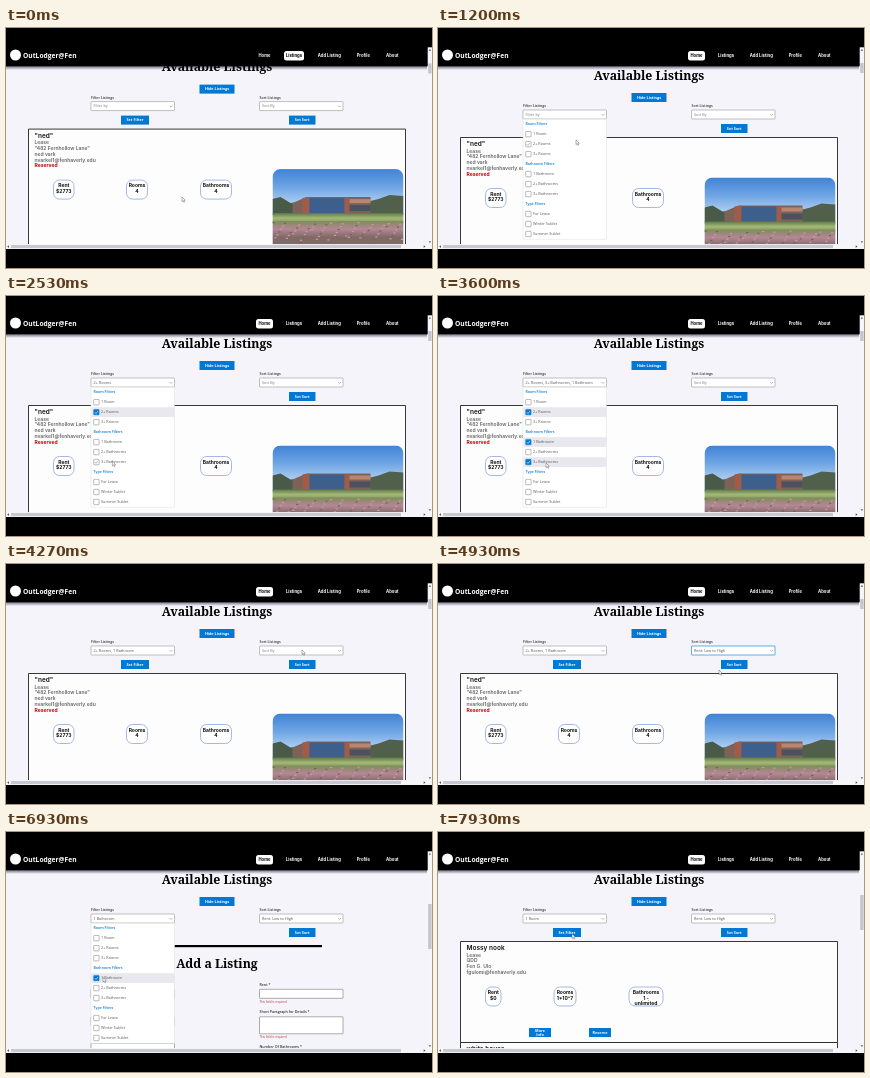
Write an HTML page with a canvas that moves like this. It is 426 px wide and 240 px high and loops after 8000 ms.

```html
<!DOCTYPE html>
<html lang="en">
<head>
<meta charset="utf-8">
<title>Available Listings</title>
<style>
  html, body { margin: 0; width: 100%; height: 100%; overflow: hidden; background: #000; }
  canvas { display: block; width: 100vw; height: 100vh; }
</style>
</head>
<body>
<canvas id="stage"></canvas>
<script>
const W = 426, H = 240, LOOP = 8000;
const canvas = document.getElementById('stage');
const ctx = canvas.getContext('2d');

const BLUE = '#0078d4', PAGE = '#f4f4fa', CARD = '#fdfdfe', INK = '#111', GREY = '#666';
const SANS = '"Open Sans", sans-serif', UI = 'Inter, sans-serif', SERIF = '"Noto Serif", serif';

// Dropdown contents: entries marked # are group headings.
const MENU = [
  '#Room Filters', '1 Room', '2+ Rooms', '3+ Rooms',
  '#Bathroom Filters', '1 Bathroom', '2+ Bathrooms', '3+ Bathrooms',
  '#Type Filters', 'For Lease', 'Winter Sublet', 'Summer Sublet'
];
const SORTS = ['Rent: Low to High', 'Rent: High to Low', 'Rooms: Low to High', 'Rooms: High to Low'];

// Timeline, in ms
const FILTER_OPEN = [[850, 4000], [6350, 7450]];
const SORT_OPEN = [4300, 4700];
const EMPTY_AT = 5500, RESULT_AT = 7830;
const TOGGLES = [
  [1500, '2+ Rooms'], [2700, '3+ Bathrooms'], [3150, '1 Bathroom'], [3720, '3+ Bathrooms'],
  [6700, '2+ Rooms'], [7000, '1 Bathroom'], [7250, '1 Room']
];
const POINTER = [
  [0, 176, 169], [350, 176, 169], [800, 130, 86], [900, 130, 87], [1200, 138, 112],
  [1450, 98, 115], [1800, 100, 117], [2400, 106, 165], [2720, 107, 166], [3080, 96, 146],
  [3200, 96, 146], [3500, 108, 167], [3800, 108, 167], [4000, 200, 92], [4250, 296, 86],
  [4350, 296, 86], [4650, 280, 96], [4720, 280, 97], [4930, 281, 106], [5100, 281, 106],
  [5420, 130, 100], [5560, 130, 100], [5930, 206, 103], [6050, 206, 103], [6300, 130, 86],
  [6400, 130, 86], [6650, 97, 115], [6720, 97, 115], [6950, 97, 146], [7020, 97, 146],
  [7220, 97, 106], [7290, 97, 106], [7450, 180, 99], [7720, 134, 101], [8000, 134, 102]
];

const LISTINGS = {
  house: {
    title: '"ned"',
    lines: ['Lease', '"482 Fernhollow Lane"', 'ned vark', 'nvarkel1@fenhaverly.edu'],
    reserved: true, photo: true,
    stats: [[47.5, 20.5, 'Rent', '$2773'], [120.5, 21, 'Rooms', '4'], [194.5, 31, 'Bathrooms', '4']]
  },
  room: {
    title: 'Mossy nook',
    lines: ['Lease', 'QDD', 'Fen G. Ulo', 'fgulomi@fenhaverly.edu'],
    stats: [[47.5, 15.5, 'Rent', '$0'], [116, 22, 'Rooms', '1*10^7'], [191, 34, 'Bathrooms', '1 -', 'unlimited']]
  }
};

const ease = p => p * p * (3 - 2 * p);
const progress = (t, a, b) => ease(Math.min(1, Math.max(0, (t - a) / (b - a))));
const within = (t, [a, b]) => t >= a && t < b;

function rect(x, y, w, h, fill) {
  ctx.fillStyle = fill;
  ctx.fillRect(x, y, w, h);
}

function rounded(x, y, w, h, r, fill, stroke, line = 0.6) {
  ctx.beginPath();
  ctx.roundRect(x, y, w, h, r);
  if (fill) { ctx.fillStyle = fill; ctx.fill(); }
  if (stroke) { ctx.strokeStyle = stroke; ctx.lineWidth = line; ctx.stroke(); }
}

function polygon(fill, ...points) {
  ctx.beginPath();
  points.forEach(([x, y]) => ctx.lineTo(x, y));
  ctx.closePath();
  ctx.fillStyle = fill;
  ctx.fill();
}

function polyline(stroke, width, ...points) {
  ctx.beginPath();
  points.forEach(([x, y]) => ctx.lineTo(x, y));
  ctx.strokeStyle = stroke;
  ctx.lineWidth = width;
  ctx.stroke();
}

function verticalFade(y0, y1, ...colors) {
  const fade = ctx.createLinearGradient(0, y0, 0, y1);
  colors.forEach((color, i) => fade.addColorStop(i / (colors.length - 1), color));
  return fade;
}

function text(str, x, y, size, { color = INK, weight = 400, font = SANS, align = 'left' } = {}) {
  ctx.font = `${weight} ${size}px ${font}`;
  ctx.fillStyle = color;
  ctx.textAlign = align;
  ctx.textBaseline = 'middle';
  ctx.fillText(str, x, y);
}

function button(label, x, y, w) {
  rect(x, y, w, 9, BLUE);
  const words = label === 'More Info' ? label.split(' ') : [label];
  words.forEach((word, i) => text(word, x + w / 2, y + 4.6 + (i - (words.length - 1) / 2) * 4, 3.8,
    { color: '#fff', weight: 700, align: 'center' }));
}

function heading(str, y) {
  text(str, 211, y, 12.3, { weight: 700, font: SERIF, align: 'center', color: '#000' });
}

function select(label, x, value, placeholder, focused) {
  text(label, x, 78.2, 3.6, { weight: 600, color: '#333' });
  rounded(x, 82, 83.5, 9, 0.5, '#fff', focused ? BLUE : '#999', 0.6);
  text(value || placeholder, x + 2.5, 86.7, 3.8, { color: value ? '#555' : '#777' });
  polyline('#777', 0.5, [x + 78.5, 86], [x + 80, 87.5], [x + 81.5, 86]);
}

function photo(x, y) {
  ctx.save();
  ctx.beginPath();
  ctx.roundRect(x, y, 131, 88, 8);
  ctx.clip();
  ctx.translate(x, y);
  rect(0, 0, 131, 88, verticalFade(0, 36, '#3f83d6', '#6fa5e4', '#b4d2f2'));
  // Trees behind the building
  polygon('#4a5a48', [0, 30], [8, 28], [18, 34], [30, 33], [36, 46], [0, 46]);
  polygon('#50604a', [94, 33], [106, 30], [117, 26], [131, 27], [131, 46], [94, 46]);
  // Building with its glass front
  polygon('#7d6259', [20, 34], [34, 28], [98, 28], [98, 45], [20, 45]);
  polygon('#a05c47', [30, 29], [37, 28], [37, 45], [30, 45]);
  rect(37, 29, 35, 15, '#3d5f8c');
  rect(72, 29, 5, 16, '#a05c47');
  rect(77, 30, 21, 4, '#b98670');
  rect(77, 36, 21, 6, '#4c5160');
  rect(0, 44, 131, 10, verticalFade(44, 54, '#5f7a48', '#a3b876', '#7f9a55'));
  rect(0, 52, 131, 36, verticalFade(52, 68, '#7f8b5c', '#b48795', '#806a66'));
  for (let i = 0; i < 65; i++) {
    rect((i * 37.7) % 131, 53 + (i * 7.3) % 18, 2.2, 1.2, i % 3 ? '#d68eb2' : '#5f7446');
  }
  ctx.restore();
}

function listing({ title, lines, stats, reserved, photo: hasPhoto }, y, h) {
  rounded(22.5, y, 377, h, 0, CARD, '#222', 0.9);
  text(title, 28.5, y + 6.8, 6.5, { weight: 600, font: UI });
  lines.forEach((line, i) => text(line, 28.5, y + 13.5 + i * 5.8, 5, { weight: 600, font: UI, color: GREY }));
  if (reserved) text('Reserved', 28.5, y + 36.8, 5, { weight: 700, font: UI, color: '#c00000' });
  const top = reserved ? 51 : 45.5;
  for (const [x, w, ...rows] of stats) {
    rounded(x, y + top, w, 19, 6, '#fff', '#7d9cd8', 0.7);
    rows.forEach((row, i) => text(row, x + w / 2, y + top + 5.7 + i * 5.6, 5, { weight: 700, font: UI, align: 'center' }));
  }
  if (hasPhoto) photo(266.5, y + 40);
  else {
    button('More Info', 91, y + 86.5, 22);
    button('Reserve', 151, y + 86.5, 22);
  }
}

function input(label, x, y, h = 9) {
  text(label + ' *', x, y, 3.6, { weight: 600, color: '#333' });
  rounded(x, y + 4.3, 83.5, h, 0.5, '#fff', '#777');
  text('This field is required', x, y + h + 7.9, 2.9, { color: '#b33a3f' });
}

function addForm() {
  rect(106, 113, 210, 2.2, '#000');
  heading('Add a Listing', 132.5);
  input('Name of Listing', 85, 153);
  input('Name', 85, 180.5);
  input('Listing Address', 85, 207);
  input('Rent', 253.5, 153);
  input('Short Paragraph for Details', 253.5, 180.5, 17);
  input('Number Of Bathrooms', 253.5, 215);
}

function filterMenu(selected, [px, py]) {
  rounded(85, 91.3, 83.5, 120, 0.5, '#fff', '#ddd', 0.5);
  MENU.forEach((item, i) => {
    const y = 96.2 + i * 9.98;
    if (item[0] === '#') {
      text(item.slice(1), 87.5, y, 3.6, { weight: 600, color: BLUE });
      return;
    }
    const checked = selected.includes(item);
    const hovered = px > 85 && px < 168 && Math.abs(py - y) < 5;
    if (checked) rect(85.3, y - 4.9, 83, 9.8, '#e8e8ee');
    rounded(87.7, y - 2.7, 5.4, 5.4, 0.5, checked ? BLUE : '#fff', checked ? BLUE : '#777', 0.5);
    if (checked || hovered) {
      polyline(checked ? '#fff' : '#888', 0.6, [88.8, y], [90, y + 1.3], [92.1, y - 1.2]);
    }
    text(item, 95, y + 0.2, 3.8, { color: '#555' });
  });
}

function sortMenu([, py]) {
  rounded(253.5, 91.3, 83.5, 40, 0.5, '#fff', '#ddd', 0.5);
  SORTS.forEach((item, i) => {
    const y = 96.2 + i * 10;
    if (Math.abs(py - y) < 5) rect(253.8, y - 4.9, 83, 9.8, '#f0eff1');
    text(item, 256, y, 3.8, { color: '#555' });
  });
}

function navigation(active) {
  rect(0, 38, 421, 4, verticalFade(38, 42, 'rgba(0,0,30,.55)', 'rgba(0,0,30,0)'));
  rect(0, 0, W, 38.3, '#000');
  ctx.beginPath();
  ctx.arc(9.5, 27, 5.5, 0, Math.PI * 2);
  ctx.fillStyle = '#fff';
  ctx.fill();
  text('OutLodger@Fen', 17, 27.8, 6.7, { weight: 700, color: '#fff' });
  const items = [['Home', 258.5], ['Listings', 288], ['Add Listing', 323.3], ['Profile', 357.3], ['About', 386.3]];
  for (const [label, x] of items) {
    const on = label === active;
    const w = label === 'Home' ? 17 : 20;
    if (on) rounded(x - w / 2, 23, w, 9.5, 2.5, '#fff');
    text(label, x, 27.9, 4.2, { weight: 700, font: UI, align: 'center', color: on ? '#000' : '#fff' });
  }
}

function scrollbars(y, h) {
  rect(421.7, 19.3, 4.3, 197, '#f6f6fa');
  rect(422.2, y, 3.4, h, '#c4c4cc');
  polygon('#555', [423.9, 21], [425.1, 22.7], [422.7, 22.7]);
  polygon('#555', [423.9, 215], [425.1, 213.3], [422.7, 213.3]);
  rect(0, 216.3, W, 4.7, '#f6f6fa');
  rect(5, 217, 390, 3.2, '#c8c8d2');
  polygon('#555', [1.2, 218.6], [3, 217.3], [3, 219.9]);
  polygon('#555', [419.5, 218.6], [417.7, 217.3], [417.7, 219.9]);
  rect(0, 221, W, 19, '#000');
}

function pointerAt(t) {
  const i = Math.max(1, POINTER.findIndex(p => p[0] > t));
  const [t0, x0, y0] = POINTER[i - 1], [t1, x1, y1] = POINTER[i];
  const p = progress(t, t0, t1);
  return [x0 + (x1 - x0) * p, y0 + (y1 - y0) * p];
}

function pointer([x, y]) {
  ctx.save();
  ctx.translate(x, y);
  polygon('#fff', [0, 0], [0, 4.6], [1.1, 3.6], [1.9, 5.3], [2.7, 4.9], [1.9, 3.3], [3.3, 3.2]);
  ctx.strokeStyle = '#444';
  ctx.lineWidth = 0.4;
  ctx.stroke();
  ctx.restore();
}

function selectionAt(t) {
  return TOGGLES.filter(([at]) => at <= t).reduce((chosen, [, item]) =>
    chosen.includes(item) ? chosen.filter(c => c !== item) : [...chosen, item], []);
}

function draw(t) {
  const scroll = 8.4 * (1 - progress(t, 100, 450));
  const selected = selectionAt(t), cursor = pointerAt(t);
  const sorted = t >= SORT_OPEN[1], empty = t >= EMPTY_AT && t < RESULT_AT;

  rect(0, 0, W, H, PAGE);
  ctx.save();
  ctx.beginPath();
  ctx.rect(0, 38, 421.7, 178.3);
  ctx.clip();
  ctx.translate(0, -scroll);
  heading('Available Listings', 48);
  button('Hide Listings', 193.5, 65, 35);
  select('Filter Listings', 85, selected.join(', '), 'Filter by');
  select('Sort Listings', 253.5, sorted && SORTS[0], 'Sort By', t >= SORT_OPEN[0] && t < EMPTY_AT);
  button('Set Filter', 115, 96, 28);
  button('Set Sort', 283, 96, 26.5);
  if (empty) addForm();
  else if (t < EMPTY_AT) listing(LISTINGS.house, 109.5, 150);
  else {
    listing(LISTINGS.room, 109.5, 101);
    rounded(22.5, 210.5, 377, 100, 0, CARD, '#222', 0.9);
    text('white house', 28.5, 217.3, 6.5, { weight: 600, font: UI });
  }
  if (FILTER_OPEN.some(span => within(t, span))) filterMenu(selected, cursor);
  if (within(t, SORT_OPEN)) sortMenu(cursor);
  ctx.restore();

  navigation(scroll > 4 ? 'Listings' : 'Home');
  if (empty) scrollbars(72, 45);
  else if (t < EMPTY_AT) scrollbars(35 + scroll / 20, 10);
  else scrollbars(63, 35);
  pointer(cursor);
}

function frame(now) {
  const ratio = window.devicePixelRatio || 1;
  const w = Math.round(innerWidth * ratio), h = Math.round(innerHeight * ratio);
  if (canvas.width !== w || canvas.height !== h) {
    canvas.width = w;
    canvas.height = h;
  }
  ctx.setTransform(w / W, 0, 0, h / H, 0, 0);
  draw(now % LOOP);
  requestAnimationFrame(frame);
}
requestAnimationFrame(frame);
</script>
</body>
</html>
```
